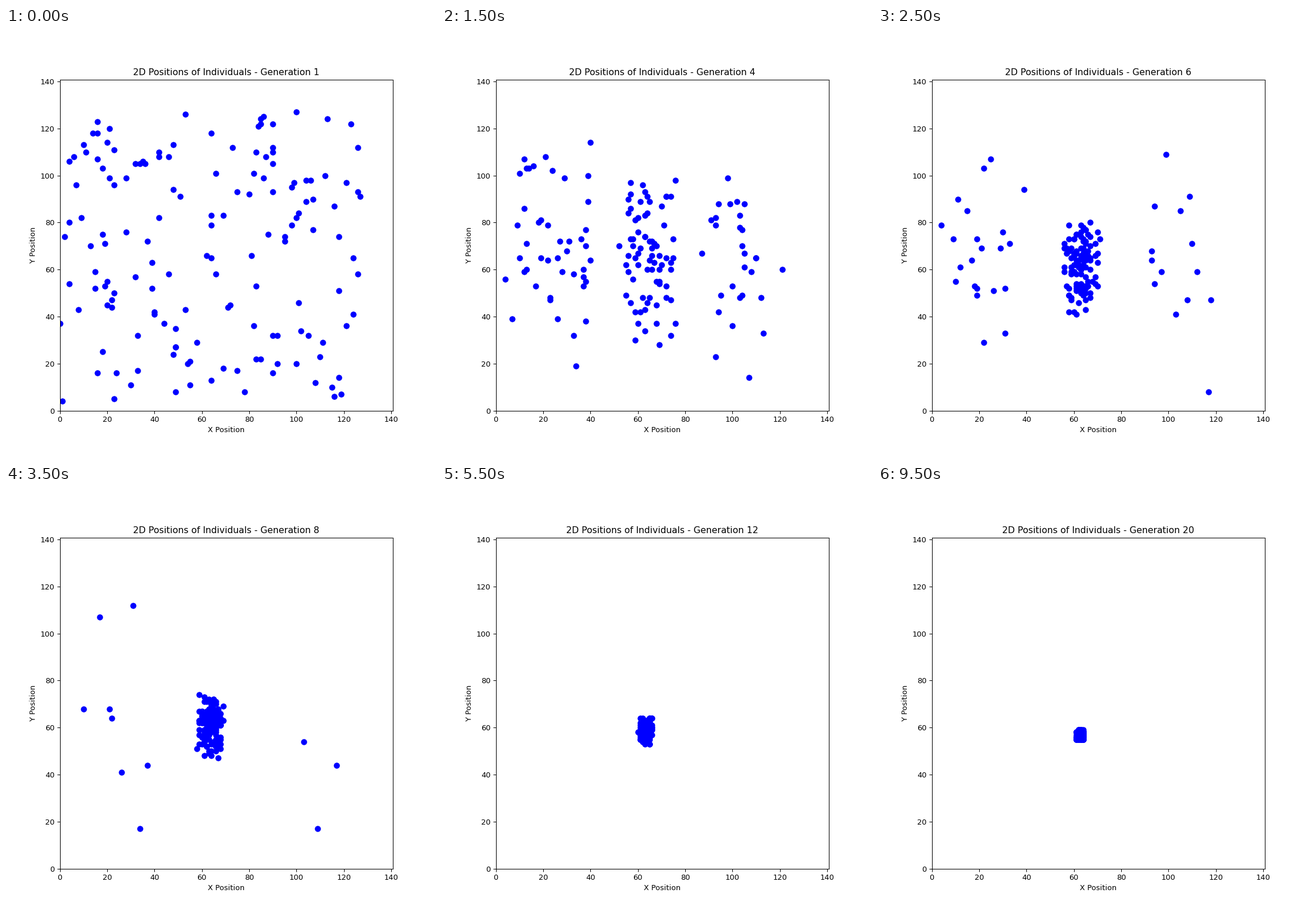
Animation of 748x748 px, one loop 10 s. Source, as a matplotlib script:

```python
import numpy as np
import matplotlib.pyplot as plt
from matplotlib.animation import FuncAnimation

SIZE = 748
INCHES = 8
WORLD = 128
POPULATION = 150
GENERATIONS = 20
INTERVAL = 500
SETTLED = 10  # first generation with nobody outside the cluster


def bounded_normal(rng, mean, spread, reach, count):
    """Normal samples; those beyond reach are spread evenly inside it."""
    offset = rng.normal(0, spread, count)
    even = rng.uniform(-reach, reach, count)
    return mean + np.where(np.abs(offset) > reach, even, offset)


def outsiders(rng, count):
    """Individuals in the bands left and right of the centre."""
    left = rng.random(count) < 0.66
    x = np.where(left, bounded_normal(rng, 22, 11, 20, count),
                 bounded_normal(rng, 104, 12, 18, count))
    y = bounded_normal(rng, 63, 26, 58, count)
    return np.column_stack([x, y])


def cluster(rng, gen, count):
    """The central group, which shrinks and sinks as generations pass."""
    decay = np.exp(-(gen - 4) / 3.8)
    spread_x, spread_y = 0.9 + 6 * decay, 1 + 19 * decay
    center_x = 64 - 1.3 * gen / GENERATIONS
    center_y = 64 - 7 * min(gen / 16, 1)
    x = bounded_normal(rng, center_x, spread_x, 1.8 * spread_x, count)
    y = bounded_normal(rng, center_y, spread_y, 1.8 * spread_y, count)
    return np.column_stack([x, y])


def positions(gen):
    rng = np.random.default_rng(40 + gen)
    if gen == 1:
        return rng.integers(0, WORLD, (POPULATION, 2))
    remaining = max(0, (SETTLED - gen) / (SETTLED - 1))
    outside = round(POPULATION * remaining ** 1.75)
    points = np.vstack([outsiders(rng, outside),
                        cluster(rng, gen, POPULATION - outside)])
    return np.clip(np.rint(points), 0, WORLD)


fig, ax = plt.subplots(figsize=(INCHES, INCHES), dpi=SIZE / INCHES)
ax.set_xlim(0, WORLD * 1.1)
ax.set_ylim(0, WORLD * 1.1)
ax.set_xlabel("X Position")
ax.set_ylabel("Y Position")
dots = ax.scatter([], [], s=50, c="blue")


def update(frame):
    gen = frame + 1
    dots.set_offsets(positions(gen))
    ax.set_title(f"2D Positions of Individuals - Generation {gen}")
    return (dots,)


anim = FuncAnimation(fig, update, frames=GENERATIONS, interval=INTERVAL,
                     repeat=True, repeat_delay=0)
plt.show()
```
